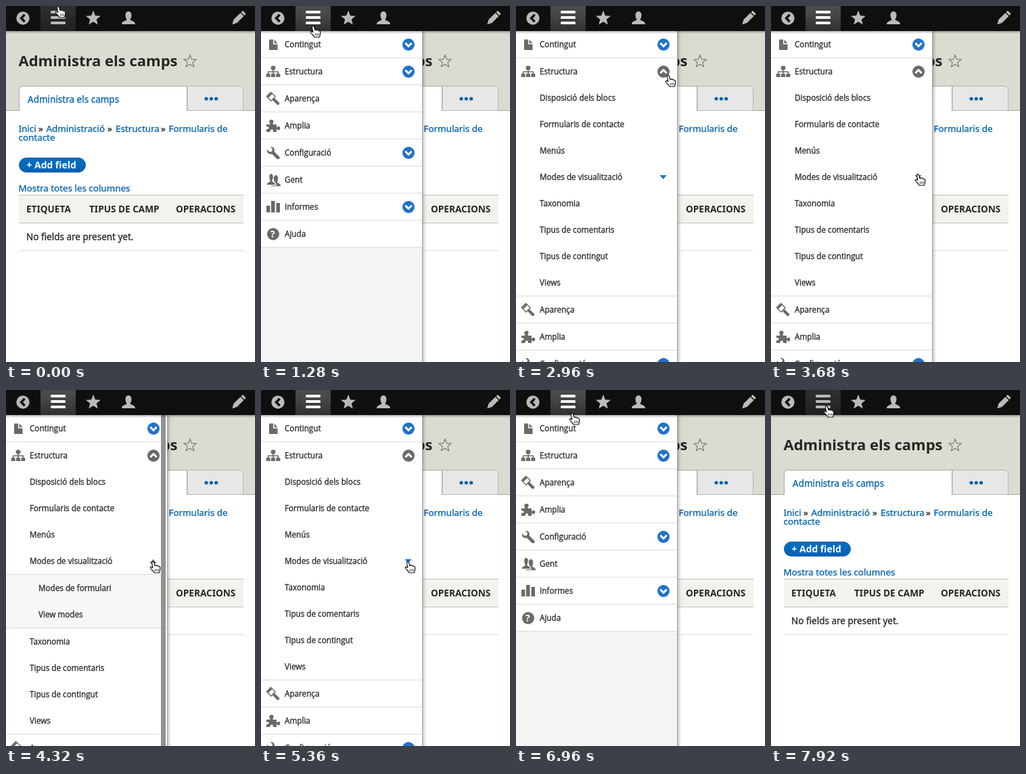
An HTML page with a canvas that plays this animation: 368x526 px, repeating every 8 s.

```html
<!DOCTYPE html>
<html lang="ca">
<head>
<meta charset="utf-8">
<title>Administra els camps</title>
<style>
html, body { margin: 0; width: 100%; height: 100%; overflow: hidden; background: #fff; }
canvas { display: block; width: 368px; height: 526px; }
</style>
</head>
<body>
<canvas id="stage"></canvas>
<script>
const W = 368, H = 526, LOOP = 8000, STEP = 80;
const canvas = document.getElementById('stage');
const ratio = window.devicePixelRatio || 1;
canvas.width = W * ratio;
canvas.height = H * ratio;
const c = canvas.getContext('2d', { alpha: false });

const PAGE = '"Noto Sans", "Open Sans", sans-serif';
const TRAY = '"Open Sans", "Noto Sans", sans-serif';
const LINK = '#0062b0', INK = '#262626', ICON = '#6a6a6a', BLUE = '#2272c5', PALE = '#bababa';

// When each part of the menu is open, in ms.
const OPEN = { tray: [560, 7440], structure: [2800, 6240], modes: [4160, 5360] };
const isOpen = (part, t) => t >= OPEN[part][0] && t < OPEN[part][1];

// Pointer stops: time, x, y of the fingertip.
const STOPS = [
  [80, 78, 1], [480, 78, 18], [640, 78, 18], [960, 78, 30], [1600, 78, 30],
  [2480, 226, 103], [3040, 226, 103], [3760, 218, 254], [5440, 218, 254],
  [6000, 226, 103], [6320, 226, 103], [6880, 84, 35], [7120, 84, 35], [7360, 83, 24]
];

function pointerAt(t) {
  const i = STOPS.findIndex(s => s[0] > t);
  if (i === 0) return STOPS[0].slice(1);
  if (i < 0) return STOPS[STOPS.length - 1].slice(1);
  const [t0, x0, y0] = STOPS[i - 1], [t1, x1, y1] = STOPS[i];
  const u = (t - t0) / (t1 - t0), e = u * u * (3 - 2 * u);
  return [x0 + (x1 - x0) * e, y0 + (y1 - y0) * e];
}

function rect(x, y, w, h, fill) {
  c.fillStyle = fill;
  c.fillRect(x, y, w, h);
}

// Regular text gets a hairline stroke for a slightly heavier weight.
function text(s, x, y, size, fill = INK, weight = 400, family = PAGE) {
  c.font = `${weight} ${size}px ${family}`;
  c.fillStyle = c.strokeStyle = fill;
  c.fillText(s, x, y);
  if (weight > 400) return;
  c.lineWidth = .3;
  c.strokeText(s, x, y);
}

function disc(x, y, r, fill) {
  c.fillStyle = fill;
  c.beginPath();
  c.arc(x, y, r, 0, 7);
  c.fill();
}

function line(points, color, width) {
  c.strokeStyle = color;
  c.lineWidth = width;
  c.beginPath();
  points.forEach(([x, y]) => c.lineTo(x, y));
  c.stroke();
}

function shape(d, x, y, fill, stroke, width = 1) {
  const p = new Path2D(d);
  c.save();
  c.translate(x, y);
  if (fill) { c.fillStyle = fill; c.fill(p); }
  if (stroke) { c.strokeStyle = stroke; c.lineWidth = width; c.stroke(p); }
  c.restore();
}

function fade(x0, y0, x1, y1, from, to) {
  const g = c.createLinearGradient(x0, y0, x1, y1);
  g.addColorStop(0, from);
  g.addColorStop(1, to);
  return g;
}

function star(x, y, r, inner) {
  c.beginPath();
  for (let i = 0; i < 10; i++) {
    const a = i * Math.PI / 5 - Math.PI / 2, d = i % 2 ? inner : r;
    c.lineTo(x + d * Math.cos(a), y + d * Math.sin(a));
  }
  c.closePath();
}

const PERSON = 'M-4.5-4.5C-4.5-12 4.5-12 4.5-4.5C4.5-1 3 1 2.5 2C3 4 10 4 10 9H-10C-10 4-3 4-2.5 2C-3 1-4.5-1-4.5-4.5Z';

// Icons are centred on their origin.
const icons = {
  file() { shape('M-6-7.5H0V-.5H6.5V8H-6ZM1.5-7.5L6.5-2H1.5Z', 0, 0, ICON); },
  tree() {
    shape('M-2-8.5H2L3.3-7V-4L2-2.5H-2L-3.3-4V-7ZM-10 3H-5L-4.3 4V8H-10.3V4ZM-2.5 3H2.5L3 4V8H-3V4ZM5 3H10L10.3 4V8H4.3V4Z', 0, 0, ICON);
    shape('M0-3V3M-7.3 3V.3H7.3V3', 0, 0, null, ICON, 1.6);
  },
  brush() {
    c.rotate(-Math.PI / 4);
    rect(-5, -10, 10, 3, ICON);
    shape('M-4.5-6.5H4.5V0H-4.5Z', 0, 0, null, ICON, 1.4);
    shape('M-2 0H2L2.2 11Q0 13-2.2 11Z', 0, 0, ICON);
  },
  puzzle() {
    shape('M-10-2H-5C-3.5-3-7-5-5.5-7.5C-4-9.5 0-9.5.5-7C1-5-1.5-3 0-2H5V2C6 3 7 0 9 1C11 2 10.5 6 8.5 6.5C6.5 7 6 4 5 5.5V9H0C-1 8 1 6-1.5 5.5C-4.5 5-4 8-5 9H-10V4.5C-8 6-6.5 4.5-6.5 3C-6.5 1-8.5.5-10 2Z', 0, 0, ICON);
  },
  wrench() {
    shape('M-4-9C1-9.5 3-5 1.5-2L9 5.5C11 8 8 10.5 5.5 9L-2 1.5C-6 3-10-.5-9-5L-5.5-1.5L-2-2L-1-5.5Z', 0, 0, ICON);
  },
  people() {
    c.save();
    c.translate(4, 1.5);
    c.scale(.72, .85);
    shape(PERSON, 0, 0, ICON);
    c.restore();
    c.save();
    c.translate(-3, -.5);
    c.scale(.72, .9);
    shape(PERSON, 0, 0, ICON, '#fff', 1.3);
    c.restore();
  },
  bars() {
    rect(-10, -2, 5.5, 10, ICON);
    rect(-3, -9, 5.5, 17, ICON);
    rect(4.5, -6, 5.5, 14, ICON);
  },
  help() {
    disc(0, 0, 9, ICON);
    text('?', -4, 5, 14, '#fff', 700, TRAY);
  }
};

const MENU = [
  ['Contingut', 'file', true], ['Estructura', 'tree', true], ['Aparença', 'brush'],
  ['Amplia', 'puzzle'], ['Configuració', 'wrench', true], ['Gent', 'people'],
  ['Informes', 'bars', true], ['Ajuda', 'help']
];
const STRUCTURE = ['Disposició dels blocs', 'Formularis de contacte', 'Menús',
  'Modes de visualització', 'Taxonomia', 'Tipus de comentaris', 'Tipus de contingut', 'Views'];
const MODES = ['Modes de formulari', 'View modes'];

const label = (s, x, cy) => text(s, x, cy + 4, 11.7, INK, 400, TRAY);
const rule = y => rect(0, y, 238, 1, '#dcdcdc');

function chevron(cy, up) {
  disc(218, cy, 9, up ? ICON : BLUE);
  const d = up ? -1 : 1;
  line([[213.3, cy - 2.2 * d], [218, cy + 2.5 * d], [222.7, cy - 2.2 * d]], '#fff', 3);
}

function page() {
  rect(0, 0, W, H, '#fff');
  rect(0, 37, W, 118, '#dbdcd1');
  text('Administra els camps', 18.5, 89, 22, INK, 700);
  star(272, 82, 9.5, 4.2);
  c.strokeStyle = '#77776f';
  c.lineWidth = 1.1;
  c.stroke();

  rect(0, 154, W, 1, '#a9aaa3');
  shape('M268 118.5H345Q350.5 118.5 350.5 124V154.5H268Z', 0, 0, '#e7e7e5', '#b5b6b0');
  shape('M19.5 155V124Q19.5 118.5 25 118.5H267.5V155Z', 0, 0, '#fff');
  shape('M19.5 155V124Q19.5 118.5 25 118.5H267.5V155', 0, 0, null, '#a9aaa3');
  text('Administra els camps', 32, 143, 13.5, LINK);
  for (const x of [296, 303.3, 310.6]) disc(x, 137, 2.6, LINK);

  [['Inici', 18.5], ['Administració', 59.5], ['Estructura', 162], ['Formularis de', 240.5]]
    .forEach(([s, x]) => text(s, x, 186, 13.4, LINK));
  for (const x of [48, 150, 229]) text('»', x, 186, 13.4);
  text('contacte', 18.5, 199, 13.4, LINK);

  c.beginPath();
  c.roundRect(19.5, 224.5, 98, 21, 10.5);
  c.fillStyle = fade(0, 224, 0, 246, '#0070c2', '#0061b5');
  c.fill();
  c.strokeStyle = '#17589b';
  c.lineWidth = 1;
  c.stroke();
  text('+ Add field', 30.5, 240, 13.9, '#fff', 700);

  text('Mostra totes les columnes', 18.5, 274, 13.4, LINK);
  rect(19, 279, 332, 42, '#f3f3ee');
  rect(19, 279, 332, 1, '#bebfb8');
  rect(19, 320, 332, 1, '#bebfb8');
  text('ETIQUETA', 30, 305, 13.6, INK, 700);
  text('TIPUS DE CAMP', 123, 305, 13.6, INK, 700);
  text('OPERACIONS', 251, 305, 13.6, INK, 700);
  text('No fields are present yet.', 30, 346, 13.5);
  rect(19, 361, 332, 1, '#dcdcd8');
}

function submenu(top, t) {
  let y = top;
  for (const name of STRUCTURE) {
    label(name, 35, y + 19);
    if (name.startsWith('Modes')) {
      const up = isOpen('modes', t);
      shape(up ? 'M-5 3L0-3L5 3Z' : 'M-5-3H5L0 3Z', 217.5, y + 19, up ? ICON : BLUE);
      if (up) {
        rect(0, y + 39, 238, 80, '#f7f7f7');
        rule(y + 38);
        rule(y + 117);
        MODES.forEach((s, i) => label(s, 48, y + 59 + 39 * i));
        y += 80;
      }
    }
    y += 39;
  }
  return y;
}

function tray(t) {
  c.save();
  c.shadowColor = 'rgba(0,0,0,.36)';
  c.shadowBlur = 5 * ratio;
  c.shadowOffsetX = ratio;
  rect(-9, 37, 248, H, '#f4f4f4');
  c.restore();

  let y = 37;
  for (const [name, icon, more] of MENU) {
    const up = name === 'Estructura' && isOpen('structure', t);
    rect(0, y, 238, up ? H : 40, '#fff');
    c.save();
    c.translate(18, y + 20);
    icons[icon]();
    c.restore();
    label(name, 35, y + 20);
    if (more) chevron(y + 20, up);
    y += 40;
    if (up) y = submenu(y, t);
    rule(y - 1);
  }
  rect(238, 37, 1, H, '#a6a6a6');

  // Overlay scrollbar shown after the list grows.
  if (isOpen('modes', t)) {
    c.globalAlpha = Math.max(0, Math.min(1, (4960 - t) / 320));
    rect(229, 37, 7, H, '#929292');
    c.globalAlpha = 1;
  }
}

function toolbar(active) {
  rect(0, 37, W, 4, fade(0, 37, 0, 41, 'rgba(0,0,0,.3)', 'rgba(0,0,0,0)'));
  rect(0, 0, W, 37, '#0f0f0f');
  const glow = `rgba(255,255,255,${active ? .25 : .125})`;
  rect(51, 0, 52, 37, fade(0, 7, 0, 74, glow, 'rgba(255,255,255,0)'));

  disc(25, 18, 9.7, PALE);
  line([[27.7, 12.8], [22.5, 18], [27.7, 23.2]], '#0f0f0f', 3.4);
  for (const y of [7, 15, 23]) {
    c.beginPath();
    c.roundRect(66, y, 22, 4, 1.5);
    c.fillStyle = active ? '#fff' : PALE;
    c.fill();
  }
  star(129, 18.3, 11.5, 5);
  c.fillStyle = PALE;
  c.fill();
  shape(PERSON, 181, 18, PALE);

  c.save();
  c.translate(343.5, 18);
  c.rotate(Math.PI / 4);
  shape('M-3.5-11.5Q-3.5-12.5-2.5-12.5H2.5Q3.5-12.5 3.5-11.5V-9H-3.5ZM-3.5-7.6H3.5V6.5L0 13L-3.5 6.5Z', 0, 0, PALE);
  c.restore();
}

function pointer(x, y) {
  c.lineJoin = 'round';
  shape('M-2.5 1.5C-3-.8 0-1.2.6 1L2 5.8C2.4 4.5 4.4 4.7 4.7 6C5.4 5 7.2 5.4 7.4 6.8C8.6 6.2 9.6 7 9.7 8.5C9.9 11.5 9 13 8.6 16H1C0 13.5-2.8 11.8-4.4 9.3C-5.4 7.4-3.2 6.6-1.2 8.6Z', x, y, '#fff', '#111', 1.2);
  shape('M2.4 10.5V13.7M4.8 10.5V13.7M7 10.5V13.7', x, y, null, '#111', .9);
  c.lineJoin = 'miter';
}

function draw(now) {
  const t = Math.floor((now % LOOP) / STEP) * STEP;
  const open = isOpen('tray', t);
  c.setTransform(ratio, 0, 0, ratio, 0, 0);
  page();
  if (open) tray(t);
  toolbar(open);
  pointer(...pointerAt(t).map(Math.round));
}

const start = performance.now();
function tick() {
  draw(performance.now() - start);
  requestAnimationFrame(tick);
}
tick();
</script>
</body>
</html>
```
